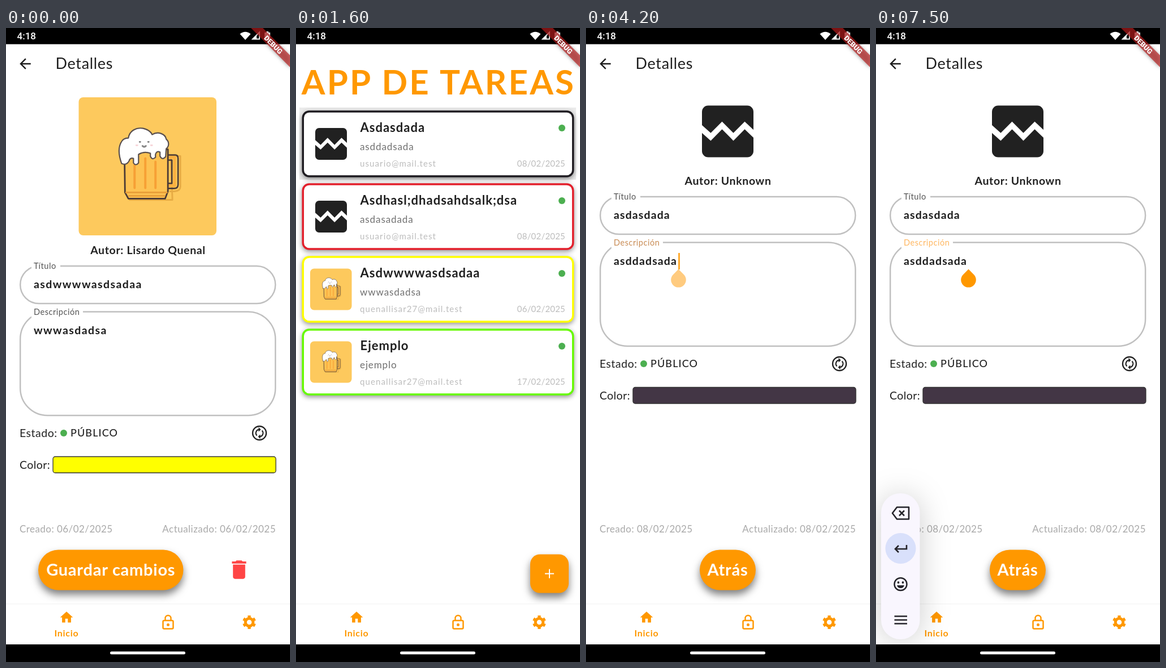
Write an HTML page that moves like this. It is 502x1116 px and loops after 7600 ms.

```html
<!DOCTYPE html>
<html lang="es">
<head>
<meta charset="utf-8">
<title>App de tareas</title>
<style>
html, body { margin: 0; width: 100%; height: 100%; overflow: hidden; background: #fff; }
svg { display: block; }
text { font-family: Lato, "Open Sans", sans-serif; white-space: pre; }
text.sys { font-family: Roboto, sans-serif; }
.raised { filter: drop-shadow(0 8px 7px rgba(0,0,0,.5)); }
.card { filter: drop-shadow(0 3px 4px rgba(0,0,0,.42)); }
.float { filter: drop-shadow(0 4px 26px rgba(0,0,0,.2)); }
</style>
</head>
<body>
<svg id="stage" width="502" height="1116" viewBox="0 0 502 1116">
<defs>
  <g id="beer" stroke-linejoin="round" stroke-linecap="round">
    <path d="M90 181H166L163 104H180V158Q180 165 170 166H162" fill="none" stroke="#d99a35" stroke-width="3" opacity=".6"/>
    <path d="M157 102H171Q176 102 176 108V154Q176 161 169 161H157M157 111H165V152H157" fill="none" stroke="#4a3a35" stroke-width="2.6"/>
    <path d="M160 106H170V156H160" fill="none" stroke="#fbb040" stroke-width="5"/>
    <path d="M81 92H158V166L153 179H88L82 168Z" fill="#fdc252" stroke="#4a3a35" stroke-width="2.8"/>
    <path d="M84 168H156M89 174H152" fill="none" stroke="#e9a03a" stroke-width="3"/>
    <path d="M99 114V160M118 108V160M136 114V160" fill="none" stroke="#f7a035" stroke-width="4"/>
    <path d="M76 117C72 106 69 91 75 80C78 73 84 72 88 72C90 59 102 53 114 55C122 57 128 61 130 66C140 60 153 64 155 74C161 79 160 87 155 91L154 105Q148 112 144 104V97Q138 94 136 101V106Q130 112 127 104V99Q116 95 106 101V116Q101 122 97 116V108Q91 106 89 113Q84 121 76 117Z" fill="#fff" stroke="#5a504e" stroke-width="2.2"/>
    <path d="M108 79h1M123 79h1M113 86q3 3 6 0" fill="none" stroke="#888" stroke-width="3"/>
    <path d="M102 85h2M128 85h2" stroke="#f7d6da" stroke-width="3"/>
  </g>
  <g id="broken" fill="#212121">
    <path d="M12 0H88A12 12 0 0 1 100 12V47L83 31 61 53 39 31 17 53 0 38V12A12 12 0 0 1 12 0Z"/>
    <path d="M0 53L17 68 39 46 61 68 83 46 100 62V88A12 12 0 0 1 88 100H12A12 12 0 0 1 0 88Z"/>
  </g>
</defs>
</svg>
<script>
const ORANGE = '#ff9800', LOOP = 7600, STEP = 100;
const stage = document.getElementById('stage');
const $ = id => document.getElementById(id);

const text = (x, y, s, size, fill, { w = 400, ls = .5, a = 'start', id = '' } = {}) =>
  `<text ${id && `id="${id}"`} x="${x}" y="${y}" font-size="${size}" fill="${fill}" font-weight="${w}" letter-spacing="${ls}" text-anchor="${a}">${s}</text>`;
const rect = (x, y, w, h, r, fill, extra = '') =>
  `<rect x="${x}" y="${y}" width="${w}" height="${h}" rx="${r}" fill="${fill}" ${extra}/>`;
const icon = (cx, cy, k, d, fill) =>
  `<path transform="translate(${cx} ${cy}) scale(${k}) translate(-12 -12)" d="${d}" fill="${fill}" fill-rule="evenodd"/>`;
const line = (d, color, w, extra = '') =>
  `<path d="${d}" fill="none" stroke="${color}" stroke-width="${w}" ${extra}/>`;
const mug = (x, y, w, h, r) => rect(x, y, w, h, r, '#fdc95d') +
  `<svg x="${x}" y="${y}" width="${w}" height="${h}" viewBox="0 0 244 244" preserveAspectRatio="xMidYMid slice"><use href="#beer"/></svg>`;
const broken = (cx, cy, size) =>
  `<use href="#broken" transform="translate(${cx - size / 2} ${cy - size / 2}) scale(${size / 100})"/>`;

// Outlined input with a gap in the border for its label
const field = (y, h, r, label, gap, value, ls, id) =>
  rect(25.2, y, 451, h, r, 'none', 'stroke="#c0c0c0" stroke-width="2.5"') +
  rect(45, y - 4, gap - 45, r > 40 ? 15 : 9, 0, '#fff') +
  text(49, y + 5, label, 14.6, '#555', { id }) +
  text(49, y + 39, value, 19.5, '#1c1c1c', { w: 700, ls });

const syncIcon = line('M436 713a12 12 0 1 0 24 0a12 12 0 1 0-24 0', '#222', 2.4) +
  line('M443.5 717.5A6.3 6.3 0 0 1 447 706.8M452.5 708.5A6.3 6.3 0 0 1 449 719.2', '#222', 2) +
  '<path d="M446.5 702.8v8l4-4zM449.5 715.2v8l-4-4z" fill="#222"/>';

const page = o => `<g id="${o.id}">
  ${rect(0, 28, 502, 987, 0, '#fff')}
  <circle id="${o.id}Ripple" cx="34" cy="62" r="23.5" fill="#000" opacity="0"/>
  ${icon(34, 63, 1.22, 'M20 11H7.83l5.59-5.59L12 4l-8 8 8 8 1.41-1.41L7.83 13H20z', '#1c1c1c')}
  ${text(87.5, 71.5, 'Detalles', 27, '#1f1f1f', { ls: .65 })}
  <g id="${o.id}Body">
    ${text(251, 398, 'Autor: ' + o.author, 19.5, '#222', { w: 700, ls: .65, a: 'middle' })}
    ${field(419, 66, 33, 'Título', 96, o.title, o.ls, '')}
    ${field(499.5, 182.5, 48, 'Descripción', 136, o.desc, o.ls, o.id + 'Label')}
    ${text(24, 719.5, 'Estado:', 19.5, '#222')}
    <circle cx="102" cy="713" r="6" fill="#4caf50"/>
    ${text(114, 719, 'PÚBLICO', 18, '#222', { w: 500, ls: 1.1 })}
    ${syncIcon}
    ${text(24, 775.5, 'Color:', 19.5, '#222', { ls: .4 })}
    ${rect(83, 754.5, 394, 28.5, 4, o.color, 'stroke="#333" stroke-width="1.3"')}
  </g>
  ${text(24, 888, 'Creado: ' + o.date, 17, '#a9a9a9', { ls: .45 })}
  ${text(477, 888, 'Actualizado: ' + o.date, 17, '#a9a9a9', { ls: .48, a: 'end' })}
  ${rect(o.bx, 918.5, o.bw, 71, 35.5, ORANGE, 'class="raised"')}
  ${text(o.bx + o.bw / 2, 963.5, o.button, 29, '#fff', { w: 700, ls: .75, a: 'middle' })}
  ${o.extra}
</g>`;

const trash = icon(412, 953.5, 1.8, 'M6 19c0 1.1.9 2 2 2h8c1.1 0 2-.9 2-2V7H6zM19 4h-3.5l-1-1h-5l-1 1H5v2h14z', '#ff4545');
const caret = `<rect id="caret" x="163.3" y="396" width="2.4" height="29" fill="${ORANGE}"/>
  <path id="handle" d="M163.5 424.5L172.9 433.9A13.3 13.3 0 1 1 154.1 433.9Z" fill="${ORANGE}"/>`;

const tasks = [
  ['Asdasdada', 'asddadsada', 'usuario@mail.test', '08/02/2025', '#1e1b20'],
  ['Asdhasl;dhadsahdsalk;dsa', 'asdasadada', 'usuario@mail.test', '08/02/2025', '#e3202c'],
  ['Asdwwwwasdsadaa', 'wwwasdadsa', 'quenallisar27@mail.test', '06/02/2025', '#ffff00'],
  ['Ejemplo', 'ejemplo', 'quenallisar27@mail.test', '17/02/2025', '#66fa00']
];
const card = ([title, sub, mail, date, color], i) => {
  const y = 147 + i * 128;
  return rect(12.3, y, 477.4, 114, 11, '#fff', `stroke="${color}" stroke-width="3.5" class="card"`) +
    `<g id="thumb${i}">${i < 2 ? broken(62, y + 57, 56) : mug(25, y + 20.5, 73.5, 73, 7)}</g>` +
    text(113.5, y + 35.5, title, 22, '#1f1f1f', { w: 700, ls: 1 }) +
    text(113, y + 67.5, sub, 17, '#707070', { ls: .9 }) +
    text(113, y + 96.5, mail, 15, '#bdbdbd', { ls: 1.1 }) +
    text(476, y + 96.5, date, 15, '#bdbdbd', { ls: .2, a: 'end' }) +
    `<circle cx="470" cy="${y + 29}" r="6" fill="#4caf50"/>`;
};

const list = `<g id="list">
  ${text(252, 117, 'APP DE TAREAS', 60, ORANGE, { w: 700, ls: 3.2, a: 'middle' })}
  <rect id="press" x="6" y="140" width="489" height="127" fill="#000" opacity="0"/>
  ${tasks.map(card).join('')}
</g>`;

const fab = `<g id="fab"><rect x="-34" y="-34" width="68" height="68" rx="17" fill="${ORANGE}" class="raised"/>
  ${line('M-8 0H8M0-8V8', '#fff', 2)}</g>`;

const nav = `${rect(0, 1014, 502, 72, 0, '#fff')}${rect(0, 1013, 502, 1.5, 0, '#f5f5f5')}
  ${icon(107, 1037.5, 1.13, 'M10 20v-6h4v6h5v-8h3L12 3 2 12h3v8z', ORANGE)}
  ${text(107, 1070.5, 'Inicio', 16, ORANGE, { w: 700, ls: .7, a: 'middle' })}
  ${rect(277.5, 1043, 18, 14.5, 2, 'none', `stroke="${ORANGE}" stroke-width="2.5"`)}
  ${line('M281.5 1043v-4a5 5 0 0 1 10 0v4', ORANGE, 2.4)}
  <circle cx="286.5" cy="1050.5" r="2.5" fill="${ORANGE}"/>
  <g fill="none" stroke="${ORANGE}"><circle cx="430" cy="1046" r="6.8" stroke-width="5"/>
  <circle cx="430" cy="1046" r="10" stroke-width="4" pathLength="12" stroke-dasharray="1 1" stroke-dashoffset="-.5"/></g>`;

const INK = '#25242a';
const toolbar = `<g id="toolbar">${rect(9, 819, 68.5, 257, 34, '#f9f6fe', 'class="float"')}
  <circle cx="43.5" cy="916" r="27" fill="#d9e0fb"/>
  ${line('M37 843.5H58V864.5H37L29 854Z', INK, 2.6, 'stroke-linejoin="round"')}
  ${line('M41 849.5l9 9m0-9l-9 9', INK, 2.5)}
  ${line('M54 910v7H34m6-6l-6 6 6 6', INK, 2.6)}
  <circle cx="43.5" cy="979" r="11" fill="none" stroke="${INK}" stroke-width="2.5"/>
  <circle cx="39.5" cy="976" r="1.9" fill="${INK}"/><circle cx="47.5" cy="976" r="1.9" fill="${INK}"/>
  <path d="M37 981h13a6.7 6.7 0 0 1-13 0z" fill="${INK}"/>
  ${line('M32.5 1035.5h22.5m-22.5 6.5h22.5m-22.5 6.5h22.5', INK, 2.5)}</g>`;

const system = `${rect(0, 0, 502, 28.5, 0, '#000')}${rect(0, 1085, 502, 31, 0, '#000')}
  ${rect(184, 1097.5, 133, 5, 2.5, '#fff')}
  <text class="sys" x="19.5" y="20" font-size="17" font-weight="500" fill="#fff">4:18</text>
  <path d="M413.5 10.5Q423 3 432.5 10.5L423 21Z" fill="#fff"/>
  ${line('M436 19.5L448 7.5V19.5Z', '#fff', 2)}<path d="M436 20L443 13V20Z" fill="#fff"/>
  <path d="M457 8h3V6h4v2h3v13h-10z" fill="#fff"/>
  <path d="M433 0h21L502 48V69Z" fill="#b71c1c" fill-opacity=".68" style="filter:drop-shadow(0 1px 3px rgba(0,0,0,.5))"/>
  <text class="sys" transform="translate(472.6 29.4) rotate(45)" y="4.5" text-anchor="middle" font-size="12.5" font-weight="900" fill="#fff">DEBUG</text>`;

stage.insertAdjacentHTML('beforeend', rect(0, 0, 502, 1116, 0, '#fff') + list +
  page({ id: 'beerPage', author: 'Lisardo Quenal', title: 'asdwwwwasdsadaa', desc: 'wwwasdadsa', ls: 1.4,
    color: '#ffff00', date: '06/02/2025', button: 'Guardar cambios', bx: 57, bw: 256.5, extra: trash }) +
  page({ id: 'taskPage', author: 'Unknown', title: 'asdasdada', desc: 'asddadsada', ls: 1.1,
    color: '#433645', date: '08/02/2025', button: 'Atrás', bx: 201, bw: 99, extra: caret }) +
  '<g id="mugHero"></g><g id="brokenHero"></g>' + fab + nav + toolbar + system);

// Tracks: [ms, values...], linear between rows
const tracks = {
  beerAlpha: [[1000, 1], [1300, 0]],
  taskAlpha: [[1600, 0], [1700, .13], [1800, .45], [1900, .82], [2000, 1]],
  ripple: [[900, 0], [1000, .07], [1200, .07], [1300, 0]],
  press: [[1500, 0], [1600, .08], [1700, .12], [1800, .12], [2000, 0]],
  mugBox: [[1000, 128.5, 122, 372, 365], [1100, 62, 230, 212, 408], [1200, 25.5, 401.5, 99, 486.5], [1300, 25, 423.5, 98.5, 496.5]],
  broken: [[1600, 62, 204, 56], [1700, 78, 206, 68], [1800, 201, 223.5, 91], [1900, 246, 241, 91], [1999, 250, 243, 91], [2000, 250.5, 182, 91]],
  fab: [[1000, 0], [1100, .5], [1200, 1], [1600, 1], [1700, .68], [1800, .16], [1900, 0]],
  handle: [[4100, 0], [4200, .5], [4300, 1]],
  label: [[4100, 85, 85, 85], [4200, 201, 140, 85], [4300, 255, 183, 97]],
  toolbar: [[4300, 0], [4400, .3], [4500, .7], [4600, 1]]
};
const at = (name, t) => {
  const rows = tracks[name], i = rows.findIndex(r => r[0] > t);
  if (i === 0) return rows[0].slice(1);
  if (i < 0) return rows[rows.length - 1].slice(1);
  const [a, b] = [rows[i - 1], rows[i]], k = (t - a[0]) / (b[0] - a[0]);
  return a.slice(1).map((v, j) => v + (b[j + 1] - v) * k);
};
const fade = (id, v) => {
  $(id).setAttribute('opacity', v);
  $(id).style.visibility = v > 0 ? 'visible' : 'hidden';
};

function draw(t) {
  fade('beerPage', at('beerAlpha', t)[0]);
  fade('taskPage', at('taskAlpha', t)[0]);
  $('beerPageRipple').setAttribute('opacity', at('ripple', t)[0]);
  $('press').setAttribute('opacity', at('press', t)[0]);
  $('taskPageBody').setAttribute('transform', `translate(0 ${t < 2000 ? 0 : -122})`);

  const [l, top, r, b] = at('mugBox', t);
  $('mugHero').innerHTML = t < 1300 ? mug(l, top, r - l, b - top, 8) : '';
  $('brokenHero').innerHTML = t >= 1700 ? broken(...at('broken', t)) : '';
  fade('thumb2', t < 1300 ? 0 : 1);
  fade('thumb0', t < 1700 ? 1 : 0);
  const s = at('fab', t)[0];
  fade('fab', s > 0 ? 1 : 0);
  $('fab').setAttribute('transform', `translate(448 960.5) scale(${s})`);

  fade('caret', t >= 4100 && t < 4700 ? 1 : 0);
  fade('handle', at('handle', t)[0]);
  $('taskPageLabel').setAttribute('fill', `rgb(${at('label', t).map(Math.round)})`);
  fade('toolbar', at('toolbar', t)[0]);
}

const start = performance.now();
let last = -1;
function tick() {
  const t = Math.floor((performance.now() - start) % LOOP / STEP) * STEP;
  if (t !== last) draw(last = t);
  requestAnimationFrame(tick);
}
tick();
</script>
</body>
</html>
```
